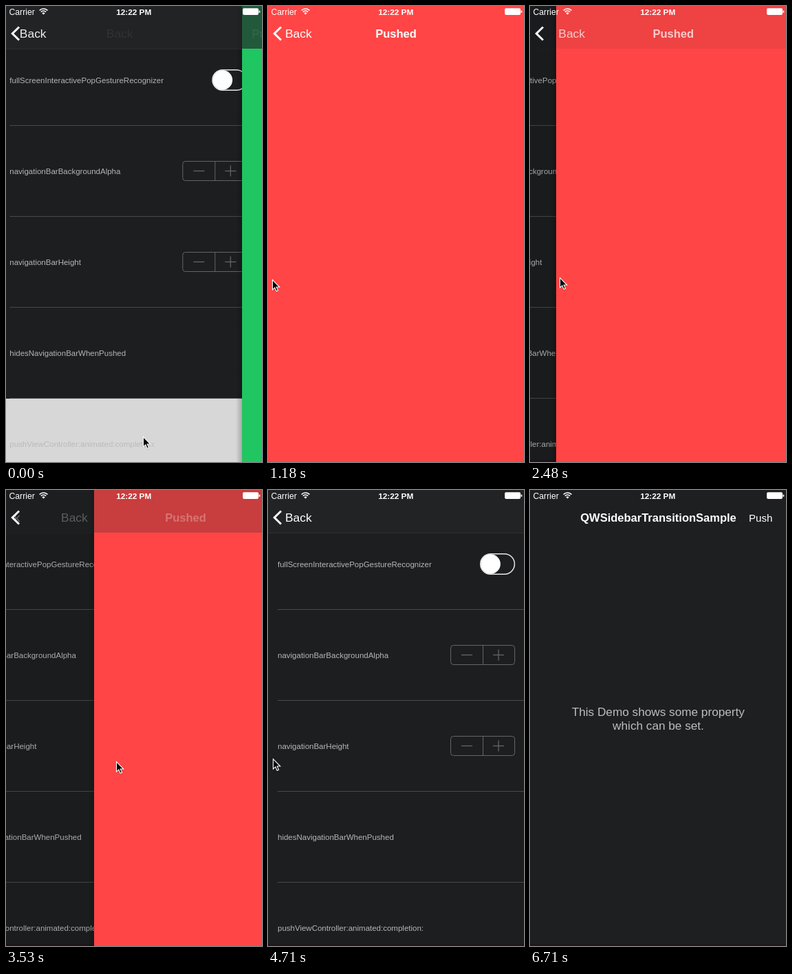
These frames come from a looping animation (372x662 px, 8470 ms). An HTML page with a canvas:

```html
<!DOCTYPE html>
<html lang="en">
<head>
<meta charset="utf-8">
<title>Navigation transitions</title>
<style>
  html, body { margin: 0; width: 100%; height: 100%; overflow: hidden; background: #1e1f21; }
  canvas { display: block; width: 372px; height: 662px; }
</style>
</head>
<body>
<canvas id="stage"></canvas>
<script>
const W = 372, H = 662, LOOP = 8470, TICK = 117.8;
const BAR_H = 62, ROW_H = 132, PARALLAX = 0.3;
const POP_DONE = 34;      // tick at which the list becomes the front page
const PUSH_COMPLETE = 5;  // tick at which the pushed page changes colour
const FAMILY = '"Liberation Sans", Arial, sans-serif';
const ROWS = [
  'fullScreenInteractivePopGestureRecognizer',
  'navigationBarBackgroundAlpha',
  'navigationBarHeight',
  'hidesNavigationBarWhenPushed',
  'pushViewController:animated:completion:'
];

// Keys: [tick, left edge of the front page]
const PAGE = [
  [0, 343], [1, 165], [2, 48], [3, 11], [4, 1], [5, 0],
  [10, 0], [14, 214], [16, 292], [17, 284], [21, 38], [23, 12], [24, 0],
  [26, 0], [30, 128], [33, 330], [POP_DONE - 0.01, 372], [POP_DONE, 0],
  [41, 0], [45, 160], [48, 335], [49, 350], [50, 350], [51, 367], [52, 372]
];
// Keys: [tick, x, y]
const POINTER = [
  [0, 199, 625], [3, 190, 612], [9, 8, 399], [10, 6, 397],
  [14, 242, 393], [16, 306, 393], [17, 294, 393], [21, 43, 394],
  [24, 14, 394], [25, 11, 394], [26, 11, 394], [30, 160, 394],
  [33, 338, 394], [34, 346, 394], [40, 7, 390], [41, 7, 390],
  [45, 183, 389], [48, 345, 389], [49, 353, 389], [54, 353, 389],
  [56, 364, 416], [57, 390, 440]
];

const canvas = document.getElementById('stage');
const ctx = canvas.getContext('2d');
const ratio = window.devicePixelRatio || 1;
canvas.width = W * ratio;
canvas.height = H * ratio;

function track(keys, tick) {
  const next = keys.findIndex(key => key[0] > tick);
  if (next < 0) return keys[keys.length - 1].slice(1);
  const a = keys[next - 1], b = keys[next];
  const k = (tick - a[0]) / (b[0] - a[0]);
  return a.slice(1).map((v, i) => v + (b[i + 1] - v) * k);
}

function text(str, x, y, size, { color = '#fff', bold = false, align = 'left', alpha = 1 } = {}) {
  ctx.globalAlpha = alpha;
  ctx.font = `${bold ? 'bold ' : ''}${size}px ${FAMILY}`;
  ctx.textAlign = align;
  ctx.fillStyle = color;
  ctx.fillText(str, x, y);
  ctx.globalAlpha = 1;
}

function rect(x, y, w, h, color) {
  ctx.fillStyle = color;
  ctx.fillRect(x, y, w, h);
}

function roundRect(x, y, w, h, r, color, width) {
  ctx.beginPath();
  ctx.roundRect(x, y, w, h, r);
  ctx.strokeStyle = ctx.fillStyle = color;
  if (width) {
    ctx.lineWidth = width;
    ctx.stroke();
  } else {
    ctx.fill();
  }
}

function polyline(points, color, width) {
  ctx.beginPath();
  points.forEach(([x, y]) => ctx.lineTo(x, y));
  ctx.strokeStyle = color;
  ctx.lineWidth = width;
  ctx.stroke();
}

function disc(x, y, r, color) {
  ctx.beginPath();
  ctx.arc(x, y, r, 0, Math.PI * 2);
  ctx.fillStyle = color;
  ctx.fill();
}

function darkPage(color) {
  rect(0, 0, W, H, color);
  rect(0, 659, W, 3, '#21161a');
}

function stepper(y) {
  const color = '#646566';
  roundRect(265.5, y + 0.5, 93, 28, 4, color, 1);
  polyline([[312.5, y], [312.5, y + 29]], color, 1);
  polyline([[281, y + 14.5], [297, y + 14.5]], color, 1.3);
  polyline([[327, y + 14.5], [343, y + 14.5]], color, 1.3);
  polyline([[335, y + 6.5], [335, y + 22.5]], color, 1.3);
}

function listPage(pressed) {
  darkPage('#1d1e20');
  if (pressed) rect(0, 570, W, H - 570, '#d9d9d9');
  ROWS.forEach((label, i) => {
    const selected = pressed && i === 4;
    text(label, 14, 111.5 + ROW_H * i, 11.5, { color: selected ? '#bcbcbc' : '#b6b6b7' });
    if (i < 4) rect(14, 173 + ROW_H * i, W, 1, '#48494b');
  });
  roundRect(308.7, 92.7, 49.6, 29.6, 14.8, '#e8e8e8', 1.5);
  disc(323.5, 107.5, 14.3, '#fff');
  stepper(225);
  stepper(225 + ROW_H);
}

function rootPage() {
  darkPage('#1e1f21');
  const style = { color: '#bdbdbe', align: 'center' };
  text('This Demo shows some property', 186.3, 328, 17.2, style);
  text('which can be set.', 186.5, 348, 17.2, style);
}

function pages(left, drawBack, drawFront) {
  const rest = 1 - left / W;
  ctx.save();
  ctx.translate(-PARALLAX * (W - left), 0);
  drawBack();
  ctx.restore();
  // The page behind may end before the front page begins
  rect(0, 0, W, H, `rgba(0,0,0,${0.1 * rest})`);
  if (left >= W) return;
  ctx.save();
  ctx.translate(left, 0);
  if (left > 0) {
    const shade = ctx.createLinearGradient(-9, 0, 0, 0);
    shade.addColorStop(0, 'rgba(0,0,0,0)');
    shade.addColorStop(1, 'rgba(0,0,0,0.22)');
    rect(-9, 0, 9, H, shade);
  }
  drawFront();
  ctx.restore();
}

function barBackground(alpha) {
  rect(0, 0, W, BAR_H, `rgba(36,37,39,${0.73 * alpha})`);
  rect(0, BAR_H, W, 1, `rgba(255,255,255,${0.07 * alpha})`);
}

function chevron(alpha) {
  ctx.globalAlpha = alpha;
  polyline([[19, 30.5], [9.3, 40], [19, 49.5]], '#fff', 3);
  ctx.globalAlpha = 1;
}

function backLabel(x, alpha) {
  ctx.save();
  ctx.beginPath();
  [[W, 0], [20, 0], [20, 30], [10, 40], [20, 50], [20, 62], [W, 62]].forEach(p => ctx.lineTo(...p));
  ctx.clip();
  text('Back', x - 1, 46, 17.4, { alpha });
  ctx.restore();
}

function title(str, center, alpha) {
  text(str, center, 46, 16.5, { bold: true, align: 'center', alpha });
}

function statusBar() {
  text('Carrier', 4.5, 12.7, 12.2);
  text('12:22 PM', 185.7, 12.7, 11.8, { bold: true, align: 'center' });
  ctx.strokeStyle = '#fff';
  ctx.lineWidth = 1.7;
  for (const r of [5, 8]) {
    ctx.beginPath();
    ctx.arc(54.5, 12, r, -Math.PI * 0.76, -Math.PI * 0.24);
    ctx.stroke();
  }
  ctx.beginPath();
  ctx.moveTo(54.5, 12.5);
  ctx.arc(54.5, 12.5, 3, -Math.PI * 0.76, -Math.PI * 0.24);
  ctx.fillStyle = '#fff';
  ctx.fill();
  roundRect(344, 3.3, 23, 9.6, 1.8, '#fff');
  roundRect(367.6, 6.4, 1.6, 3.6, 0.8, '#fff');
}

function pointer(x, y) {
  ctx.save();
  ctx.translate(x, y);
  ctx.beginPath();
  [[0.5, 0.5], [0.5, 15], [3.8, 11.9], [6.2, 17.2], [8.6, 16.2], [6.2, 11], [10.8, 11]]
    .forEach(p => ctx.lineTo(...p));
  ctx.closePath();
  ctx.shadowColor = 'rgba(0,0,0,0.35)';
  ctx.shadowBlur = 2 * ratio;
  ctx.shadowOffsetY = ratio;
  ctx.fillStyle = '#000';
  ctx.strokeStyle = '#fff';
  ctx.lineWidth = 1.1;
  ctx.fill();
  ctx.shadowColor = 'transparent';
  ctx.stroke();
  ctx.restore();
}

function colourScene(tick, left) {
  const p = left / W, fade = (1 - p) ** 3;
  const pushing = tick < PUSH_COMPLETE;
  pages(left, () => listPage(pushing), () => rect(0, 0, W, H, pushing ? '#1fc662' : '#ff4545'));
  barBackground(p);
  backLabel(26 - 66 * (1 - p), p);
  backLabel(26 + (pushing ? 131 : 160) * p, Math.max(fade, 0.07 * (p > 0)));
  title('Pushed', 186 + 218 * p, Math.max(fade, 0.07 * (p > 0)));
  chevron(1);
}

function rootScene(left) {
  const p = left / W;
  pages(left, rootPage, () => listPage(false));
  barBackground(1 - p);
  backLabel(26 + 160 * p, (1 - p) ** 3);
  title('QWSidebarTransitionSample', 186.5 - 141 * (1 - p), p);
  text('Push', 318, 45.5, 15.1, { alpha: p });
  chevron(1 - p);
}

function draw(now) {
  const tick = Math.floor((now % LOOP + 4) / TICK);
  const [left] = track(PAGE, tick);
  ctx.setTransform(ratio, 0, 0, ratio, 0, 0);
  if (tick < POP_DONE) colourScene(tick, left);
  else rootScene(left);
  statusBar();
  pointer(...track(POINTER, tick));
}

const start = performance.now();
function frame() {
  draw(performance.now() - start);
  requestAnimationFrame(frame);
}
frame();
</script>
</body>
</html>
```
